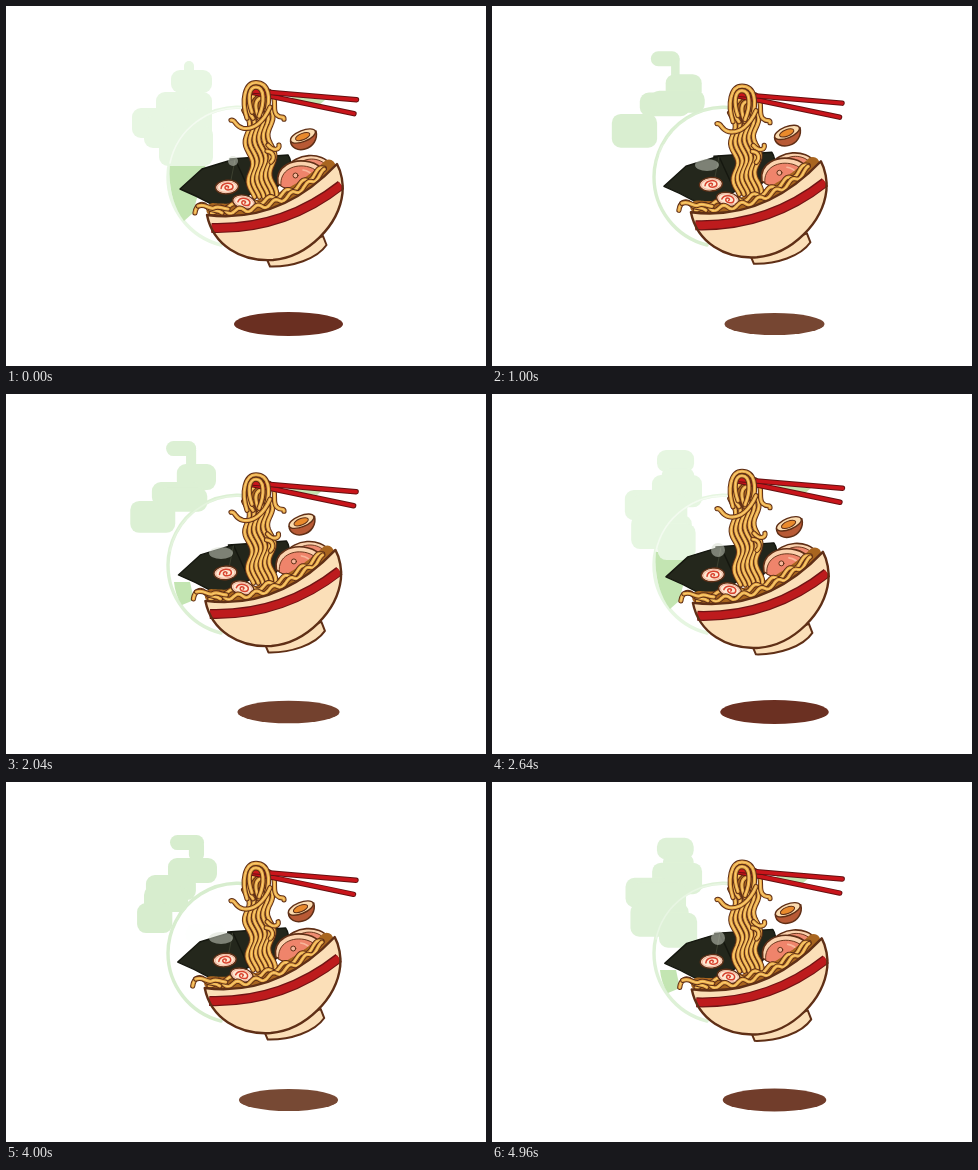
An HTML page that plays this animation: 480x360 px, repeating every 5 s.

```html
<!DOCTYPE html>
<html lang="en">
<head>
<meta charset="utf-8">
<title>Ramen bowl</title>
<style>
html, body { margin: 0; width: 100%; height: 100%; overflow: hidden; background: #fff; }
svg { display: block; width: 100vw; height: 100vh; }
</style>
</head>
<body>
<svg id="stage" viewBox="0 0 480 360" stroke-linecap="round" stroke-linejoin="round"></svg>
<script>
const LOOP = 5000, BOB = 2800, PUFF = 1150;
const INK = '#5f2f16', GOLD = '#e9a947', LIGHT = '#f9cd72', SHADE = '#a8651f', CREAM = '#fbdfb8';
const stage = document.getElementById('stage');
const mix = (a, b, u) => a + (b - a) * u;
const clamp = v => Math.max(0, Math.min(1, v));
const blend = (a, b, u) => a.map((v, i) => Math.round(mix(v, b[i], u)));
const rgb = c => `rgb(${c.join()})`;

// Steam puffs as x, y, width, height at a given phase
const opening = [
  { at: 0, puffs: [[178,55,10,17], [165,64,41,23], [150,86,56,40], [126,102,60,30], [138,110,68,32], [153,120,54,40], [160,125,46,35]] },
  { at: .25, puffs: [[174,50,9,17], [164,57,39,22], [162,76,47,33], [132,96,40,28], [145,94,44,32], [138,120,27,36], [150,105,30,22]] }
];
const rising = [
  { at: .3, puffs: [[165,56,37,22], [170,74,32,14], [160,81,50,32], [133,96,45,30], [140,100,55,35], [139,121,60,34], [166,130,38,36]] },
  { at: .48, puffs: [[164,53,34,15], [183,56,15,24], [162,76,49,25], [140,93,50,25], [138,104,44,26], [131,121,35,30], [180,142,40,20]] },
  { at: .78, puffs: [[160,47,30,15], [180,51,10,24], [171,70,39,26], [146,88,50,24], [124,107,45,32], [152,93,50,24], [170,138,42,26]] }
];

const strand = d =>
  `<path d="${d}" fill="none" stroke="${INK}" stroke-width="5.2"/>` +
  `<path d="${d}" fill="none" stroke="${GOLD}" stroke-width="3.2"/>` +
  `<path d="${d}" fill="none" stroke="${LIGHT}" stroke-width="1.1"/>`;
const line = pts => 'M' + pts.map(p => p.map(v => v.toFixed(1)).join(' ')).join('L');

// Noodles lying along the front rim
function rim(lift, from, to, phase = 0, amp = 2.4) {
  const pts = [];
  for (let t = from; t <= to; t += .01) {
    const a = (1 - t) * (1 - t), b = 2 * t * (1 - t), c = t * t;
    pts.push([201 * a + 274 * b + 331 * c,
      209 * a + 218 * b + 158 * c - lift + amp * Math.sin(t * 48 + phase)]);
  }
  return line(pts);
}

function naruto(x, y, turn) {
  return `<g transform="translate(${x} ${y}) rotate(${turn})">
    <ellipse rx="11.5" ry="6.8" fill="#fde8d2" stroke="${INK}" stroke-width="1.4"/>
    <ellipse rx="9.7" ry="5.2" fill="none" stroke="#f2b39c" stroke-width="1"/>
    <path d="M-6 1C-5-5 6-5 6 0C6 4-3 4-2 0C-1-2 3-1 1 1" fill="none" stroke="#d8432f" stroke-width="1.5"/></g>`;
}

const stick = d =>
  `<path d="${d}" stroke="#651111" stroke-width="5.4"/><path d="${d}" stroke="#c9151b" stroke-width="3.4"/>`;

const body = 'M201 209Q274 218 331 158C335.5 166 337.5 178 336.5 187C333 219 302 251 267 254C235 256 207 239 201 209Z';

stage.innerHTML = `
<ellipse id="shadow" cx="282.5" cy="318"/>
<path id="ring" d="M215 239A70 70 0 0 1 162 171A70 70 0 0 1 262 108" fill="none" stroke-width="3.4"/>
<g id="land" fill="#c3e5b2">
  <path d="M164 158H200L187 207L178 215Q164 196 163.5 168Z"/>
  <path d="M168 188L184 188L188 206L176 211Q169 201 168 188Z"/>
  <path d="M286 90L319 94L311 101L284 97Z"/>
</g>
<g id="steam">${'<rect/>'.repeat(7)}</g>
<path id="gloss" d="M164 157A70 70 0 0 1 238 102" fill="none" stroke="#f4fbf1" stroke-width="1.6"/>
<g class="bowl">
  <path d="M224 153L282 149Q286 155 284 162L268 186L232 188Z" fill="#23261b" stroke="#15170f" stroke-width="1.4"/>
  <path d="M174 183L196 163Q212 158 229 153L245 188L225 199L207 199Q191 190 174 183Z" fill="#24271c" stroke="#15170f" stroke-width="1.4"/>
  <path d="M229 154L225 174M250 151L243 183" stroke="#3c4030" stroke-width="1" fill="none"/>
  <g stroke="${INK}" stroke-width="1.6">
    <path d="M281 162C289 147 316 145 325 159L326 173L300 180Z" fill="#fbd2ae"/>
    <path d="M290 161C297 150 314 151 321 160L320 172L300 176Z" fill="#ee8b70" stroke-width=".9"/>
    <path d="M272 178C269 160 287 152 304 156C316 159 321 166 320 178L295 190Z" fill="#fbd2ae"/>
    <path d="M275 180C273 164 289 157 303 161C313 164 317 171 315 180L295 188Z" fill="#ef846b" stroke-width=".9"/>
    <circle cx="289.5" cy="169.5" r="2.5" fill="#f8b59a" stroke-width="1"/>
    <path d="M297 164Q304 165 308 171" fill="none" stroke="#f8b59a"/>
  </g>
  <path d="${rim(6, .04, .94, 0, 0)}" fill="none" stroke="${SHADE}" stroke-width="13"/>
</g>
<ellipse id="wisp" fill="#d5dccd"/>
<g id="egg">
  <path d="M284.5 135C285 142 292 145 299 143C307 141 312 133 310 125Z" fill="#b85a35" stroke="${INK}" stroke-width="1.5"/>
  <g transform="translate(297 130) rotate(-22)" stroke="${INK}">
    <ellipse rx="13.2" ry="5.6" fill="#fbdcb0" stroke-width="1.4"/>
    <ellipse cx="-.5" cy=".4" rx="7.6" ry="3.2" fill="#e98a2c" stroke-width="1"/>
  </g>
</g>
<path id="hollow" d="M242 112C237 94 241 78 250 78C262 78 263 92 260 112Z" fill="${SHADE}"/>
<g id="column"></g>
<g id="inner">
  ${strand('M263 85C273 92 265 104 271 109C275 113 278 109 278 113')}
  ${strand('M247 112C239 102 243 93 248 89')}
  ${strand('M253 112C248 100 250 94 254 92')}
</g>
<g id="sticks" fill="none">
  ${stick('M245 86L348 107.5')}${stick('M244 84.5L350.5 93.5')}
</g>
<g id="loop">
  ${strand('M241 112C235 94 239 76.5 250 76.5C263 76.5 265 92 260 108')}
  ${strand('M246 106C241 92 243 81 250 81C258.5 81 259 96 253 110')}
  ${strand('M264 101C258 115 248 124 237 122C228 120 230 113 225 114')}
</g>
<g id="curl">${strand('M262 139C268 146 274 143 273 139')}${strand('M261 145C268 146 269 152 265 156')}</g>
<g class="bowl">
  ${naruto(221, 181, -5)}
  ${strand(rim(10, .1, .9, 2))}
  ${naruto(238, 196, 12)}
  ${strand(rim(5, .03, .9))}
  ${strand('M189 207C190 199 196 196 201 201C206 206 211 203 216 207')}
  ${strand('M192 200C200 197 203 204 208 202C213 199 216 203 222 203')}
  <path d="M260 251L264 260.5C286 261 311 253 320.5 239L317 230Z" fill="${CREAM}" stroke="${INK}" stroke-width="2"/>
  <path d="${body}" fill="${CREAM}"/>
  <path d="M205.5 222Q278 224 335 179" fill="none" stroke="#701414" stroke-width="10" stroke-linecap="butt"/>
  <path d="M205.5 222Q278 224 335.5 179" fill="none" stroke="#bd1b1d" stroke-width="7.6" stroke-linecap="butt"/>
  <path d="${body}" fill="none" stroke="${INK}" stroke-width="2.4"/>
</g>`;

const $ = id => document.getElementById(id);
const puffs = [...$('steam').children], bowls = [...document.querySelectorAll('.bowl')];
const move = (el, x, y) => el.setAttribute('transform', `translate(${x.toFixed(2)} ${y.toFixed(2)})`);
const set = (el, o) => { for (const k in o) el.setAttribute(k, o[k]); };

$('column').innerHTML = strand('M0 0').repeat(6);
const strands = [...$('column').children];

function drawColumn(top, bottom) {
  for (let i = 0; i < 6; i++) {
    const pts = [];
    for (let y = 104; y <= 192; y += 3) {
      const u = (y - 90) / 102;
      const x = 238.5 + i * (4.9 - .6 * u) + 8 * u + 3 * Math.sin((y - 108) / 6.2 + i * .25);
      pts.push([x + .5 * bottom * u, y + mix(top, bottom, u)]);
    }
    const d = line(pts);
    for (let j = 0; j < 3; j++) strands[i * 3 + j].setAttribute('d', d);
  }
}

function drawSteam(p, low, tint) {
  const early = p < .275;
  let [a, b] = opening;
  if (!early) [a, b] = p < .48 ? rising : rising.slice(1);
  const u = (p - a.at) / (b.at - a.at);
  puffs.forEach((el, i) => {
    const [x, y, width, height] = a.puffs[i].map((v, k) => mix(v, b.puffs[i][k], u));
    const rx = Math.min(9, width / 2, height / 2);
    set(el, { x, y, width, height, rx });
  });
  // The tail bleaches to white as it curls inside the ring
  set(puffs[6], {
    fill: rgb(blend(tint, [255, 255, 255], clamp((p - .5) / .2))),
    opacity: early || p < .4 ? 1 : clamp(low * 2)
  });
  const spot = early ? [mix(227, 208, p * 4), 155, mix(5, 17, p * 4), 5]
    : p < .4 ? [226, 156, 7, 7] : [215, mix(156, 159, clamp((p - .48) / .3)), 12, 6];
  set($('wisp'), { cx: spot[0], cy: spot[1], rx: spot[2], ry: spot[3], opacity: .5 });
}

function draw(t) {
  const p = t / BOB;
  // 1 at the lowest point of the bowl, 0 at the highest
  const low = Math.pow((1 + Math.cos(2 * Math.PI * p)) / 2, 1.4);
  const up = 1 - low;
  const dip = 5.7 * (1 - Math.cos(2 * Math.PI * (p - .06))) / 2;
  const tint = blend([215, 237, 206], [231, 246, 226], low);

  set($('shadow'), { rx: 49.5 + 5 * low, ry: 11 + low, fill: rgb(blend([119, 73, 52], [106, 47, 33], low)) });
  $('ring').setAttribute('stroke', rgb(tint));
  $('steam').setAttribute('fill', rgb(tint));
  $('gloss').setAttribute('opacity', low);
  [...$('land').children].forEach((el, i) =>
    el.setAttribute('opacity', clamp((low - (i ? .1 : .58)) * 6)));

  bowls.forEach(el => move(el, -2.3 * up, -3 * up));
  move($('egg'), -2.2 * up, -4 * up);
  move($('sticks'), -.5 * up, dip);
  ['hollow', 'inner', 'loop'].forEach(id => move($(id), 0, dip));
  move($('curl'), -.8 * up, dip * .45 - 1.4 * up);
  drawColumn(dip, -3 * up);
  drawSteam((t / PUFF) % 1, low, tint);
}

function frame(now) {
  draw(Math.floor((now % LOOP) / 40) * 40);
  requestAnimationFrame(frame);
}
draw(0);
requestAnimationFrame(frame);
</script>
</body>
</html>
```
